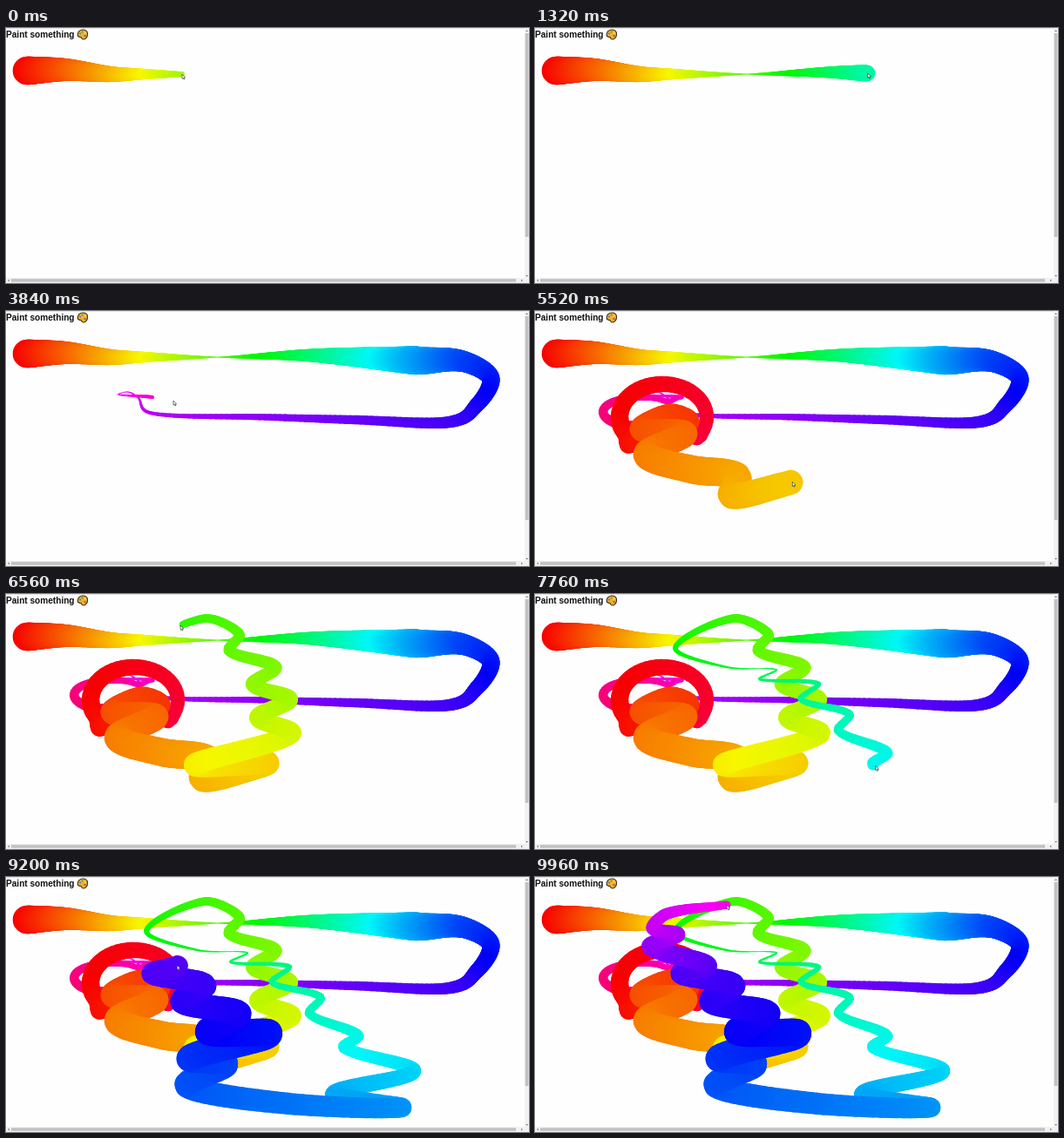
Write an HTML page with a canvas that moves like this. It is 600 px wide and 293 px high and loops after 10 s.

```html
<!DOCTYPE html>
<html lang="en">
<head>
<meta charset="utf-8">
<title>Paint something</title>
<style>
  html, body { margin: 0; width: 100%; height: 100%; overflow: hidden; background: #fefefe; }
  h1 { position: absolute; left: 0; top: 2px; margin: 0; font: bold 10.1px/12px "Liberation Sans", Arial, sans-serif; color: #111; white-space: nowrap; }
  canvas, svg { position: absolute; left: 0; top: 0; display: block; }
</style>
</head>
<body>
<h1>Paint something</h1>
<canvas id="board" width="600" height="293"></canvas>
<svg width="600" height="293" viewBox="0 0 600 293">
  <path d="M0 .3H600" stroke="#c4c4c4" stroke-width=".6"/>
  <path d="M595 0H600V293H0V287H595Z" fill="#f1f1f1"/>
  <path d="M595.7 6H599.5V240H595.7ZM6 288.3H585V291.8H6Z" fill="#c1c1c1"/>
  <path d="M596.2 4l1.4-1.8L599 4ZM596.2 284l1.4 1.8L599 284ZM3.8 288.7L2 290l1.8 1.4ZM591 288.7l1.8 1.3-1.8 1.4Z" fill="#777"/>
  <!-- palette emoji -->
  <path d="M88 2c3.8 0 5.6 2.4 5.6 5 0 3.4-2.5 6-5.200 6-2 0-1.400-1.900-2.400-2.400-1.400-.6-3.800.3-3.800-2.900C82.200 4.400 84.700 2 88 2Z" fill="#f0b02f" stroke="#3a2c20" stroke-width="1.100"/>
  <circle cx="85" cy="6.600" r="1" fill="#3b78c9"/>
  <circle cx="87.600" cy="4.400" r="1" fill="#4ba34a"/>
  <circle cx="90.700" cy="5.600" r="1" fill="#f7e05a"/>
  <circle cx="90.600" cy="9" r="1.100" fill="#d63c34"/>
  <path id="cursor" d="M0 0V5.200L1.200 4.200 2 6 2.900 5.600 2.100 3.900H3.700Z" fill="#fff" stroke="#222" stroke-width=".6"/>
</svg>
<script>
const LOOP = 10000, TICK = 40, STEP = 0.5, BRUSH = 32;

const path = [{ x: 24, y: 49, h: 0 }];

// Adds points up to the given hue, moving at an even speed
function stroke(hue, points, up = false) {
  let { x, y, h } = path.at(-1);
  const lengths = points.map(([px, py]) => {
    const d = Math.hypot(px - x, py - y);
    [x, y] = [px, py];
    return d;
  });
  const rate = (hue - h) / lengths.reduce((a, b) => a + b);
  points.forEach(([x, y], i) => path.push({ x, y, h: h += lengths[i] * rate, up }));
}

function arc(cx, cy, rx, ry, from, to, n = 12) {
  return Array.from({ length: n + 1 }, (_, i) => {
    const a = (from + (to - from) * i / n) * Math.PI / 180;
    return [cx + rx * Math.cos(a), cy + ry * Math.sin(a)];
  });
}

// Top sweep and the way back
stroke(42, [[68, 48], [120, 53]]);
stroke(102, [[155, 53], [250, 53]]);
stroke(222, [[350, 51], [475, 57], [525, 58]]);
stroke(255, [[556, 77], [541, 107], [505, 128]]);
stroke(284, [[400, 125], [300, 122], [170, 118]]);
stroke(310, [[151, 99], [140, 93], [129, 96], [168, 99]]);
stroke(314, [[192, 103], [168, 99]], true);
// Pink loop, red ring, orange tail
stroke(342, arc(122, 116, 44, 17, -45, -310));
stroke(362, arc(147, 122, 50, 38, 40, -215));
stroke(384, [[108, 153], [176, 128], [155, 119], [122, 136], [172, 141]]);
stroke(408, [[128, 165], [180, 182], [232, 190], [226, 212], [286, 199]]);
// Yellow climb and green loop
stroke(427, [[299, 194], [217, 196], [327, 161]]);
stroke(464, [[289, 142], [326, 121], [283, 104], [309, 84], [256, 65], [268, 46], [228, 28]]);
stroke(503, [[161, 62], [220, 84], [277, 87], [258, 98]]);
// Down to the lower edge
stroke(537, [[325, 103], [305, 121], [361, 138], [348, 157], [404, 182], [388, 196]]);
stroke(558, [[468, 223], [376, 250]]);
stroke(579, [[454, 265], [320, 260], [208, 240]]);
// Blue to magenta zigzag
stroke(620, [[252, 215], [211, 208], [301, 180], [232, 178], [267, 157], [202, 143], [228, 124], [168, 111], [197, 102]]);
stroke(664, [[132, 80], [164, 66], [135, 59], [152, 42], [220, 32]]);

// Time in ms to hue
const pace = [[0, 80], [2360, 222], [3120, 284], [3840, 312], [9960, 664]];

function hueAt(t) {
  const i = pace.findIndex(([end]) => end > 0 && end >= t);
  const [t0, h0] = pace[i - 1], [t1, h1] = pace[i];
  return h0 + (h1 - h0) * (t - t0) / (t1 - t0);
}

// The brush shrinks and grows by one unit per hue step
const widthAt = h => 0.8 + BRUSH * (Math.abs(99 - h % 198) / 99) ** 1.1;

function pointAt(h) {
  const last = path.length - 1;
  const i = Math.max(1, path.findIndex(p => p.h >= h - 1e-6));
  const b = path[i - 1], c = path[i];
  const a = path[Math.max(0, i - 2)], d = path[Math.min(last, i + 1)];
  const span = c.h - b.h, u = (h - b.h) / span;
  const blend = k => {
    const m = (c[k] - a[k]) / (c.h - a.h) * span, n = (d[k] - b[k]) / (d.h - b.h) * span;
    return b[k] + m * u + (3 * (c[k] - b[k]) - 2 * m - n) * u * u
      + (2 * (b[k] - c[k]) + m + n) * u * u * u;
  };
  return { x: blend("x"), y: blend("y"), h, up: c.up };
}

const dabs = [];
for (let h = 0; h <= path.at(-1).h; h += STEP) dabs.push(pointAt(h));

const ctx = document.getElementById("board").getContext("2d");
const cursor = document.getElementById("cursor");
ctx.lineCap = "round";

function draw(t) {
  const now = hueAt(t);
  ctx.clearRect(0, 0, 600, 293);
  for (let i = 1; i < dabs.length && dabs[i].h <= now; i++) {
    const a = dabs[i - 1], b = dabs[i];
    if (b.up) continue;
    ctx.strokeStyle = `hsl(${b.h % 360}, 100%, 48.5%)`;
    ctx.lineWidth = widthAt(b.h);
    ctx.beginPath();
    ctx.moveTo(a.x, a.y);
    ctx.lineTo(b.x, b.y);
    ctx.stroke();
  }
  const { x, y } = pointAt(now);
  cursor.setAttribute("transform", `translate(${x} ${y})`);
}

let start, last = 0;
function frame(now) {
  start ??= now;
  const t = Math.floor(((now - start) % LOOP) / TICK) * TICK;
  if (t !== last) draw(last = t);
  requestAnimationFrame(frame);
}
draw(0);
requestAnimationFrame(frame);
</script>
</body>
</html>
```
